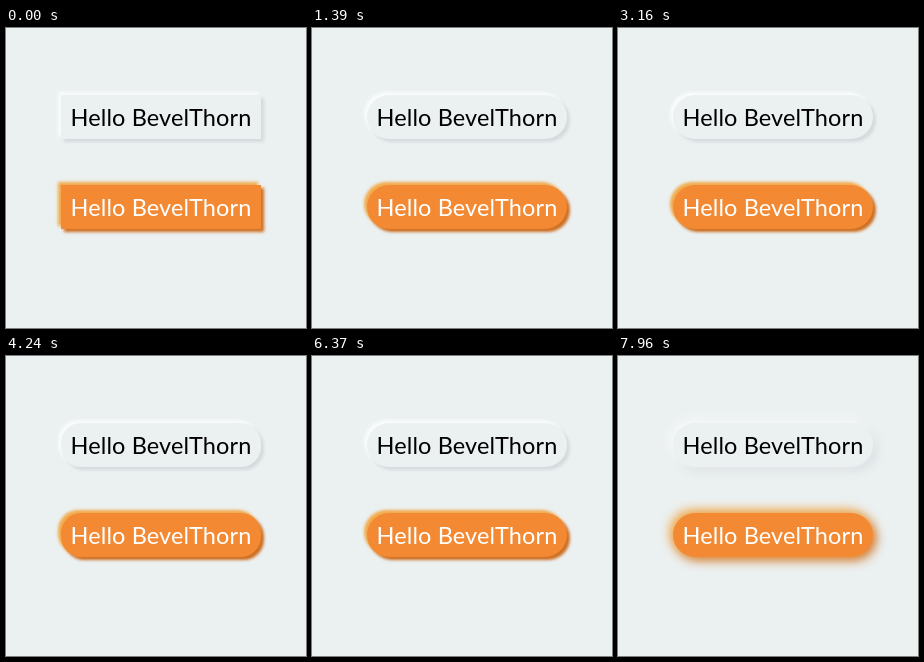
Animation, 300 px wide and 300 px high, one loop 7.99 s. Source, as an HTML page:

```html
<!DOCTYPE html>
<html lang="en">
<head>
<meta charset="utf-8">
<title>Soft shadow buttons</title>
<style>
  html, body { margin: 0; width: 100%; height: 100%; overflow: hidden; background: #ebf0f1; }
  .card {
    position: absolute; left: 55px; width: 200px; height: 44px;
    font: 400 23.5px/45px Lato, sans-serif; letter-spacing: .13px;
    text-align: center; white-space: nowrap;
  }
  .pale { top: 67px; background: #ebf0f1; color: #000; --light: #f9fbfc; --dark: #d6dadd; }
  .warm { top: 157px; line-height: 44px; background: #f38a33; color: #fff; --light: #f1ab4c; --dark: #cc6e20; }
</style>
</head>
<body>
<div class="card pale">Hello BevelThorn</div>
<div class="card warm">Hello BevelThorn</div>
<script>
const LOOP = 7990, TICK = 30, PHASE = 10;
const cards = document.querySelectorAll('.card');

// Start and end of each drag of the two sliders; every drag goes to the other extreme.
const radiusDrags = [[1120, 1390], [2200, 2590], [2830, 3160], [4180, 4510], [4660, 4960]];
const blurDrags = [[6370, 6880], [7030, 7540], [7690, 8200]];

function ease(x) {
  x = Math.min(1, Math.max(0, x));
  return x * x * (3 - 2 * x);
}

function slider(drags, low, high, t) {
  const level = drags.reduce((sum, [from, to], i) =>
    sum + (i % 2 ? -1 : 1) * ease((t - from) / (to - from)), 0);
  return low + (high - low) * level;
}

function draw(now) {
  const t = Math.floor((now % LOOP - PHASE) / TICK) * TICK + PHASE;
  const radius = slider(radiusDrags, 0, 22, t);
  const blur = slider(blurDrags, 3, 18, t);
  for (const { style } of cards) {
    style.borderRadius = `${radius}px`;
    style.boxShadow = `-3px -3px ${blur}px var(--light), 3px 3px ${blur}px var(--dark)`;
  }
}

const start = performance.now();
function frame() {
  draw(performance.now() - start);
  requestAnimationFrame(frame);
}
frame();
</script>
</body>
</html>
```
